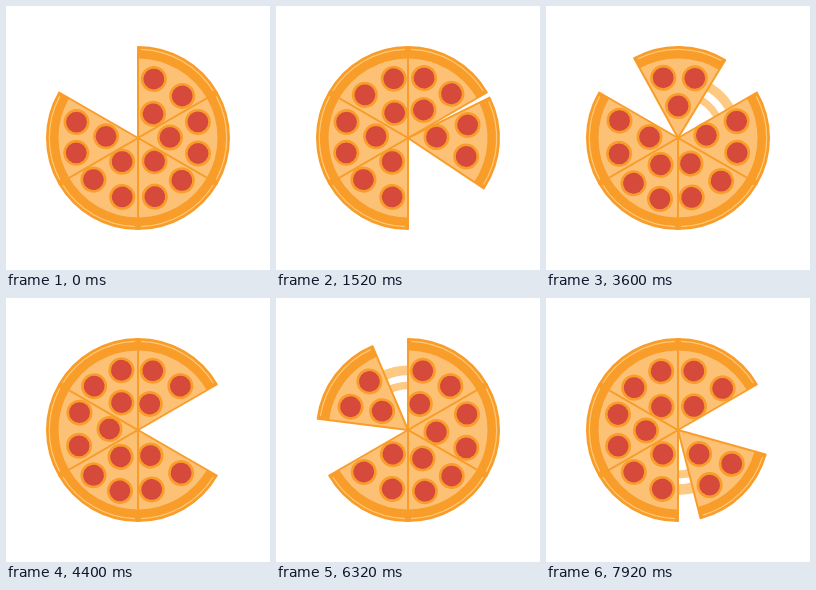
An HTML page for the animation above (8 s loop, 264 by 264 pixels).

```html
<!DOCTYPE html>
<html lang="en">
<head>
<meta charset="utf-8">
<title>Pizza</title>
<style>
  html, body { margin: 0; width: 100%; height: 100%; overflow: hidden; background: #fff; }
  svg { display: block; width: 100vw; height: 100vh; }
</style>
</head>
<body>
<svg id="stage" viewBox="0 0 264 264">
  <g transform="translate(132 132)">
    <g id="strings" fill="none" stroke="#fec982" stroke-linecap="round"></g>
    <g id="slices"></g>
  </g>
</svg>
<script>
const LOOP = 8000;
const STEP = 550;          // one slice moves per step
const START = 80, TRAVEL = 355;
const SLOT = 60;
const BREAK = 0.53;        // progress at which the cheese tears
const ORANGE = '#f99d2a', CHEESE = '#fdc176', RED = '#d64a3b';

// Toppings per slice: left angle, right angle, inner angle, outer radius, inner radius
const toppings = [
  [-15, 16.5, 2, 61, 28.5],
  [-15, 14.5, -1, 62, 32],
  [-16, 14, -5.5, 61, 28.5],
  [-15, 17, 4, 61, 28.5],
  [-13.5, 14.5, 3, 63.5, 32]
];

const strands = [
  { r: 59.5, width: 12, wallStub: 20 },
  { r: 44.5, width: 9, wallStub: 8 }
];

// Angles run clockwise from the top
function point(r, deg) {
  const a = deg * Math.PI / 180;
  return (r * Math.sin(a)).toFixed(2) + ' ' + (-r * Math.cos(a)).toFixed(2);
}

function arc(r, from, to) {
  return `M${point(r, from)}A${r} ${r} 0 0 1 ${point(r, to)}`;
}

function wedge(r) {
  return arc(r, -SLOT / 2, SLOT / 2) + 'L0 0Z';
}

function add(parent, tag, attrs) {
  const el = document.createElementNS('http://www.w3.org/2000/svg', tag);
  for (const key in attrs) el.setAttribute(key, attrs[key]);
  return parent.appendChild(el);
}

function makeSlice([left, right, inner, outerR, innerR]) {
  const g = add(document.getElementById('slices'), 'g', {});
  add(g, 'path', { d: wedge(91), fill: ORANGE });
  add(g, 'path', { d: wedge(79.5), fill: CHEESE });
  add(g, 'path', { d: arc(88.7, -28, 28), fill: 'none', stroke: '#ffc877', 'stroke-width': 1.2 });
  add(g, 'path', { d: wedge(91), fill: 'none', stroke: ORANGE, 'stroke-width': 2, 'stroke-linejoin': 'round' });
  for (const [r, deg] of [[outerR, left], [outerR, right], [innerR, inner]]) {
    const [cx, cy] = point(r, deg).split(' ');
    add(g, 'circle', { cx, cy, r: 13, fill: ORANGE });
    add(g, 'circle', { cx, cy, r: 10.4, fill: RED });
  }
  return g;
}

const slices = toppings.map(makeSlice);
const stringGroup = document.getElementById('strings');
for (const s of strands) {
  s.wall = add(stringGroup, 'path', {});
  s.tail = add(stringGroup, 'path', {});
}

function drawStrings(edge, wall, p) {
  stringGroup.style.display = p > 0 && p < 1 ? '' : 'none';
  const torn = Math.min(1, Math.max(0, (p - BREAK) / 0.38));
  for (const s of strands) {
    const whole = p < BREAK;
    // Torn ends shrink until their caps are hidden below the slices
    const wallLen = s.wallStub * (1 - torn) - 9 * torn;
    const tailLen = 2 * (1 - torn) - 9 * torn;
    const width = s.width * (1 - 0.25 * Math.min(p / BREAK, 1));
    s.wall.setAttribute('d', arc(s.r, whole ? edge - 2 : wall - wallLen, wall + 12));
    s.tail.setAttribute('d', arc(s.r, edge - 12, edge + tailLen));
    s.wall.setAttribute('stroke-width', width);
    s.tail.setAttribute('stroke-width', width);
  }
}

function render(t) {
  const move = Math.floor(t / STEP);
  const u = Math.min(1, Math.max(0, (t - move * STEP - START) / TRAVEL));
  const p = Math.pow(u, 1.55);

  slices.forEach((slice, i) => {
    const done = Math.floor((move - i + 4) / 5);
    const current = move % 5 === i;
    const angle = (i + 0.5 - done - (current ? p : 0)) * SLOT;
    slice.setAttribute('transform', `rotate(${angle.toFixed(3)})`);
    if (current) drawStrings(angle + SLOT / 2, angle + SLOT / 2 + p * SLOT, p);
  });
}

const origin = performance.now();
function frame() {
  render((performance.now() - origin) % LOOP);
  requestAnimationFrame(frame);
}
render(0);
requestAnimationFrame(frame);
</script>
</body>
</html>
```
